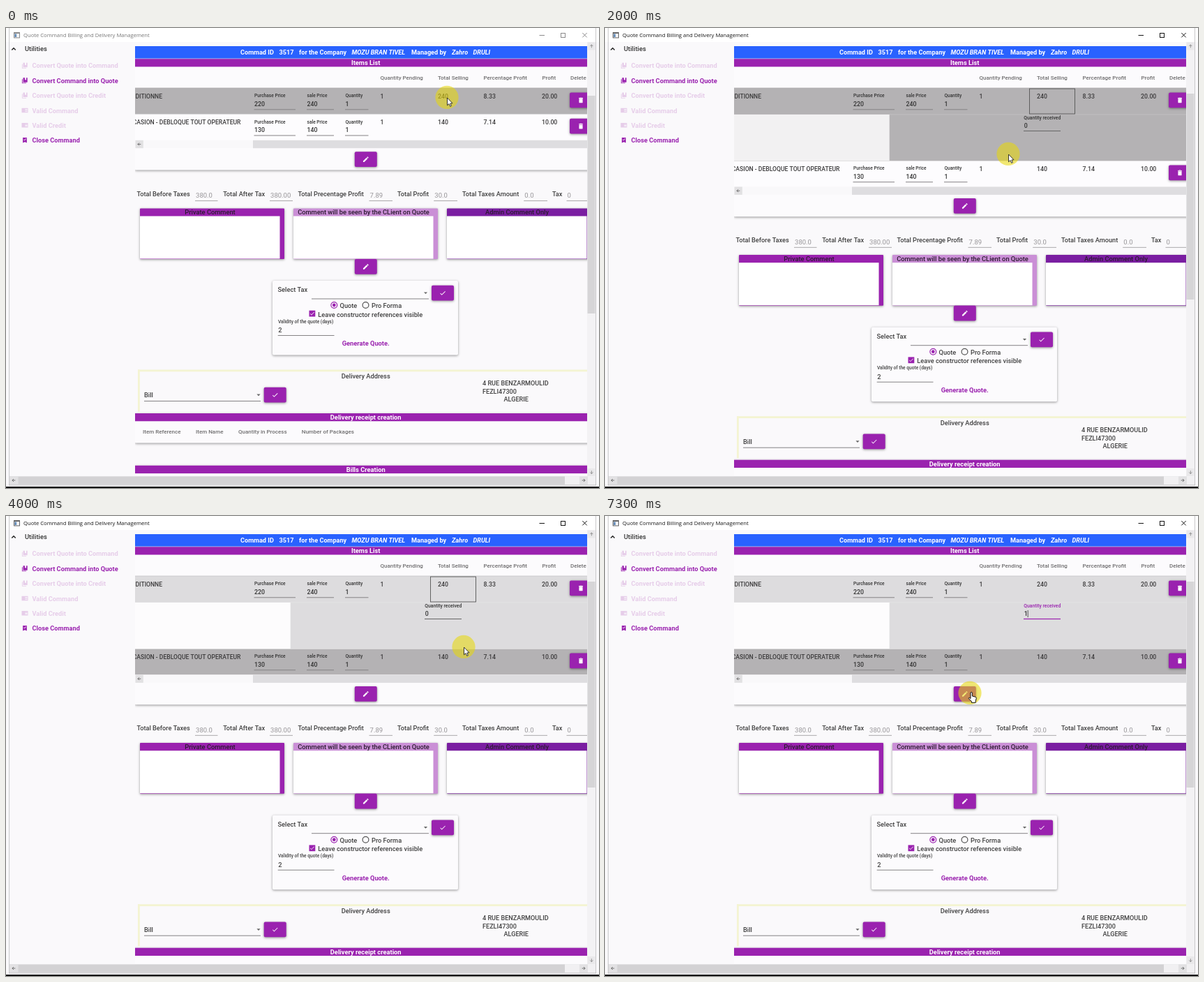
Recreate the animation shown at these times as an HTML page with a canvas. Size 850 px wide and 659 px high, loop 8000 ms.

```html
<!DOCTYPE html>
<html lang="en">
<head>
<meta charset="utf-8">
<title>Billing and delivery</title>
<style>
html, body { margin: 0; width: 100%; height: 100%; overflow: hidden; background: #faf9fb; }
canvas { display: block; width: 850px; height: 659px; }
</style>
</head>
<body>
<canvas id="stage" width="850" height="659"></canvas>
<script>
const ctx = document.getElementById('stage').getContext('2d');
const LOOP = 8000, STEP = 100, DETAIL = 66.7;
const PURPLE = '#9a22af', LILAC = '#ca8fd6', DEEP = '#7a1ea1';
const PALE = '#e6cde9', INK = '#404040', MUTED = '#706f70', PAGE = '#faf9fb';
const ROBOTO = 'Roboto, sans-serif', MID = 515.7;

const ICONS = {
  edit: 'M3 17.2V21h3.8L17.8 9.9l-3.7-3.7zM20.7 7a1 1 0 0 0 0-1.4l-2.3-2.3a1 1 0 0 0-1.4 0l-1.9 1.8 3.8 3.8z',
  check: 'M9 16.2 4.8 12l-1.4 1.4L9 19 21 7l-1.4-1.4z',
  trash: 'M6 19q0 2 2 2h8q2 0 2-2V7H6zM19 4h-3.5l-1-1h-5l-1 1H5v2h14z',
  copy: 'M2 7h2v13h13v2H2zM6 2h6v9l2.5-2 2.5 2V2h4v16H6z',
  table: 'M1 4h22v16H1zM13 8v1.7h8V8zM13 11.2v1.7h8v-1.7zM13 14.4v1.7h8v-1.7z',
  bookmark: 'M4 2h16v21l-8-4-8 4zM7 10l4 4 7-7-1.5-1.5-5.5 5.5-2.5-2.5z'
};
for (const name in ICONS) ICONS[name] = new Path2D(ICONS[name]);

const lerp = (a, b, k) => a + (b - a) * k;
const between = (t, from, to) => t >= from && t < to;

// Piecewise linear value through [time, ...values] keys
function track(keys, t) {
  const i = keys.findIndex(k => k[0] > t);
  if (i < 0) return keys[keys.length - 1].slice(1);
  if (i === 0) return keys[0].slice(1);
  const a = keys[i - 1], b = keys[i], k = (t - a[0]) / (b[0] - a[0]);
  return a.slice(1).map((v, n) => lerp(v, b[n + 1], k));
}

const POINTER = [
  [200, 632, 100], [600, 663, 105], [800, 664, 105], [1600, 664, 105], [2000, 578, 181],
  [2200, 581, 186], [2700, 606, 232], [3100, 619, 233], [3200, 619, 233], [3500, 640, 233],
  [3700, 646, 230], [4000, 656, 188], [4200, 650, 166], [4600, 618, 143], [4900, 614, 143],
  [7100, 614, 143], [7200, 572, 206], [7300, 523, 254]
];
const LABEL_FLOAT = [[5900, 1], [6200, 0], [6400, 0], [6700, 1]];

function rect(x, y, w, h, color) {
  ctx.fillStyle = color;
  ctx.fillRect(x, y, w, h);
}

function text(str, x, y, size = 9.25, color = INK, o = {}) {
  ctx.font = `${o.italic ? 'italic ' : ''}${o.weight || 500} ${size}px ${o.family || ROBOTO}`;
  ctx.textAlign = o.align || 'left';
  ctx.fillStyle = color;
  ctx.fillText(str, x, y + size * 0.355);
}

const heading = (str, x, y, color, size = 9.3) => text(str, x, y, size, color, { weight: 700, align: 'center' });
const hline = (x1, x2, y, color = '#858385', w = 1) => rect(x1, y - w / 2, x2 - x1, w, color);

function shape(points, fill, stroke, w = 1) {
  ctx.beginPath();
  points.forEach(([x, y]) => ctx.lineTo(x, y));
  if (fill) { ctx.closePath(); ctx.fillStyle = fill; ctx.fill(); }
  if (stroke) { ctx.lineWidth = w; ctx.strokeStyle = stroke; ctx.stroke(); }
}

function circle(x, y, r, fill, stroke) {
  ctx.beginPath();
  ctx.arc(x, y, r, 0, Math.PI * 2);
  if (fill) { ctx.fillStyle = fill; ctx.fill(); }
  if (stroke) { ctx.lineWidth = 1.2; ctx.strokeStyle = stroke; ctx.stroke(); }
}

function icon(name, x, y, scale, color) {
  ctx.save();
  ctx.translate(x - 12 * scale, y - 12 * scale);
  ctx.scale(scale, scale);
  ctx.fillStyle = color;
  ctx.fill(ICONS[name], 'evenodd');
  ctx.restore();
}

function card(x, y, w, h, color, r = 1) {
  ctx.save();
  ctx.shadowColor = 'rgba(0,0,0,.42)';
  ctx.shadowBlur = 3.5;
  ctx.shadowOffsetY = 1;
  ctx.beginPath();
  ctx.roundRect(x, y, w, h, r);
  ctx.fillStyle = color;
  ctx.fill();
  ctx.restore();
}

function button(x, y, name) {
  card(x, y, 32, 21.8, PURPLE, 2);
  icon(name, x + 16, y + 11, 0.43, '#fff');
}

const dropArrow = (x, y) => shape([[x - 2.6, y - 1.2], [x + 2.6, y - 1.2], [x, y + 1.5]], '#666');

// Small scrollbar arrow pointing along (dx, dy)
function scrollArrow(x, y, dx, dy, color = '#666') {
  shape([[x - dy * 2, y - dx * 2], [x + dx * 2, y + dy * 2], [x + dy * 2, y + dx * 2]], null, color, 0.9);
  if (dx) hline(x - 2.3, x + 2.3, y, color, 0.9);
  else rect(x - 0.45, y - 2.3, 0.9, 4.6, color);
}

function titleBar(active) {
  const color = active ? '#151515' : '#8b8a8b';
  rect(0, 0, 850, 20, '#fff');
  rect(11, 6, 9, 8.5, active ? '#666' : '#8a8a8a');
  rect(12, 8, 7, 5.5, '#f1f3f6');
  rect(12.5, 8.5, 2.5, 4.5, '#5c86b4');
  text('Quote Command Billing and Delivery Management', 25, 10.5, 7.65, active ? '#151515' : '#777',
    { weight: 400, family: '"Open Sans", sans-serif' });
  hline(764.5, 772, 10.5, color);
  ctx.strokeStyle = color;
  ctx.lineWidth = 1;
  ctx.strokeRect(795.5, 7.5, 6, 6);
  shape([[826.3, 7], [832.7, 13.4]], null, color);
  shape([[832.7, 7], [826.3, 13.4]], null, color);
}

function sidebar() {
  shape([[8.3, 31.5], [11, 28.7], [13.7, 31.5]], null, '#222', 1.4);
  text('Utilities', 27, 29.7, 9.35, '#333');
  [
    ['Convert Quote into Command', 'copy'],
    ['Convert Command into Quote', 'copy', true],
    ['Convert Quote into Credit', 'copy'],
    ['Valid Command', 'table'],
    ['Valid Credit', 'table'],
    ['Close Command', 'bookmark', true]
  ].forEach(([label, name, enabled], i) => {
    const y = 54.2 + i * 21.35, color = enabled ? PURPLE : PALE;
    icon(name, 27, y - 0.3, name === 'bookmark' ? 0.36 : 0.41, color);
    text(label, 37.5, y, 9.25, color, { weight: 700 });
  });
}

function banner() {
  rect(185, 26, 649, 17.6, '#2962ff');
  [
    ['Commad ID', 336], ['3517', 391.5], ['for the Company', 420],
    ['MOZU BRAN TIVEL', 495.5, true], ['Managed by', 581],
    ['Zahro', 639, true], ['DRULI', 669.5, true]
  ].forEach(([str, x, italic]) => text(str, x, 34.8, 9.15, '#fff', { weight: 700, italic }));
  rect(185, 44.2, 649, 11.3, PURPLE);
  heading('Items List', MID, 49.8, '#fff');
}

function itemRow(y, name, x, buy, sell, percent, profit) {
  text(name, x, y + 12, 8.6, '#3c3b3c');
  [['Purchase Price', buy, 356, 415], ['sale Price', sell, 431.5, 470], ['Quantity', '1', 486.5, 519.5]]
    .forEach(([label, value, x1, x2]) => {
      text(label, x1, y + 11, 6.6, '#333');
      text(value, x1, y + 22.6, 8.8, '#333');
      hline(x1 - 0.5, x2, y + 30.8);
    });
  [['1', 536.5], [sell, 619], [percent, 684.5], [profit, 768]]
    .forEach(([str, cx]) => text(str, cx, y + 12, 8.75, '#3c3b3c'));
  button(808, y + 6.5, 'trash');
}

function quantityField(t) {
  const [up] = track(LABEL_FLOAT, t);
  const focused = t >= 4900, empty = between(t, 6000, 6500);
  const x = lerp(592.5, 600.3, up), right = lerp(661.3, 653, up);
  const labelColor = !focused ? '#333' : up < 0.5 ? '#7b757d' : PURPLE;
  text('Quantity received', x, lerp(140.2, 128.2, up), lerp(8.75, 6.8, up), labelColor);
  if (!empty) text(t >= 6500 ? '1' : '0', x + 0.5, 140.2, 8.8, '#333');
  hline(x - 0.3, right, 147.5, focused ? PURPLE : '#666', focused ? 1.2 : 1);
  const blink = !between(t, 5400, 5800);
  if (focused && blink) rect(empty ? x : x + 5.4, 135, 0.9, 10.2, empty ? PURPLE : '#444');
}

function itemsCard(t, shift) {
  card(185, 44, 660, 159.5 + shift, '#fcfbfd');
  banner();
  [['Quantity Pending', 536.5], ['Total Selling', 619], ['Percentage Profit', 684.5], ['Profit', 768.5], ['Delete', 809]]
    .forEach(([str, x]) => text(str, x, 70.7, 8, MUTED));

  const overFirst = t < 2700 || between(t, 4100, 7200);
  const overSecond = between(t, 3800, 4100) || t >= 7200;
  const overBar = between(t, 2700, 3800);
  const shade = overFirst ? '#b4b2b4' : '#dddcde';

  rect(185, 86, 649, 37.5 + shift, shade);
  hline(185, 834, 86, overFirst ? '#adabad' : '#c4c3c5', 0.8);
  if (shift > 0) {
    ctx.save();
    ctx.beginPath();
    ctx.rect(185, 123.5, 649, shift);
    ctx.clip();
    rect(185, 124, 222.7, DETAIL, overFirst ? '#f2f1f2' : '#fdfcfd');
    hline(185, 834, 123.8, 'rgba(255,255,255,.35)', 0.8);
    quantityField(t);
    ctx.restore();
  }
  itemRow(86, 'DITIONNE', 185.5, '220', '240', '8.33', '20.00');
  if (between(t, 300, 4800)) {
    ctx.strokeStyle = '#555';
    ctx.lineWidth = 0.9;
    ctx.strokeRect(608.5, 87, 65, 36);
  }

  ctx.save();
  ctx.translate(0, shift);
  rect(185, 123.7, 649, 37, overSecond ? '#b4b2b4' : '#fdfcfe');
  hline(185, 834, 123.7, '#dcdbdc', 0.8);
  itemRow(123.2, 'CASION - DEBLOQUE TOUT OPERATEUR', 181.7, '130', '140', '7.14', '10.00');
  rect(185, 160.8, 649, 11.4, '#f9f8fa');
  rect(185.5, 160.8, 11.3, 11.4, '#e2e1e3');
  scrollArrow(191, 166.5, -1, 0);
  rect(354, 160.8, 480, 11.4, overBar ? '#b1b0b1' : '#dedde0');
  button(499.8, 177.2, 'edit');
  ctx.restore();
}

function totals() {
  [
    ['Total Before Taxes', 187.5, '380.0', 271.5, 303.5],
    ['Total After Tax', 311.2, '380.00', 378.5, 411],
    ['Total Precentage Profit', 418.5, '7.89', 521, 554],
    ['Total Profit', 561, '30.0', 613.7, 647],
    ['Total Taxes Amount', 654, '0.0', 742.7, 776],
    ['Tax', 783, '0', 804, 834]
  ].forEach(([label, x, value, x1, x2]) => {
    text(label, x, 237.3, 9.2);
    text(value, x1 + 0.6, 240, 9.5, '#979598', { weight: 400 });
    hline(x1 - 0.5, x2, 247.6, '#a3a1a3', 0.9);
  });
}

function commentBox(x, title, color) {
  card(x, 258.4, 207, 72.6, color);
  rect(x, 269.5, 200.5, 61, '#fff');
  text(title, x + 100.5, 264, 9.3, '#2b1a30', { align: 'center' });
}

function quoteCard() {
  card(382, 362, 266, 106.5, '#fcfbfd', 2);
  text('Select Tax', 389.5, 375.2);
  hline(438, 606, 388);
  dropArrow(601.5, 379.6);
  button(610, 368.8, 'check');
  circle(470.3, 397, 4.4, null, PURPLE);
  circle(470.3, 397, 2.4, PURPLE);
  text('Quote', 478.5, 397.8);
  circle(515.5, 397, 4.4, null, '#555');
  text('Pro Forma', 524, 397.8);
  rect(434.5, 404.7, 8.8, 8.8, PURPLE);
  icon('check', 438.9, 409, 0.34, '#fff');
  text('Leave constructor references visible', 447.3, 410.4);
  text('Validity of the quote (days)', 390, 420.2, 6.6);
  text('2', 390.3, 432.7);
  hline(389.7, 470.5, 440.5);
  heading('Generate Quote.', MID, 452, PURPLE);
}

function delivery() {
  rect(189, 489.5, 645, 2.8, '#f4f4d2');
  rect(189, 489.5, 2.8, 60, '#f4f4d2');
  text('Delivery Address', MID, 498.5, 9.3, INK, { align: 'center' });
  text('4 RUE BENZARMOULID', 683, 509.2, 9.1);
  text('FEZLI47300', 683, 520.6, 9.1);
  text('ALGERIE', 713.5, 532, 9.1);
  text('Bill', 198, 525.7);
  hline(198, 365, 534.5);
  dropArrow(362, 525.7);
  button(369.7, 514.8, 'check');

  card(185, 552, 660, 42.5, '#fcfbfd');
  rect(185, 552, 649, 11.3, PURPLE);
  heading('Delivery receipt creation', MID, 557.8, '#fff');
  [['Item Reference', 196], ['Item Name', 272], ['Quantity in Process', 333], ['Number of Packages', 423.7]]
    .forEach(([str, x]) => text(str, x, 578.3, 8, MUTED));

  card(185, 626.8, 660, 60, '#fcfbfd');
  rect(185, 626.8, 649, 11.3, PURPLE);
  heading('Bills Creation', MID, 632.5, '#fff');
}

function mainPane(t, open) {
  ctx.save();
  ctx.beginPath();
  ctx.rect(185, 20, 648, 622.3);
  ctx.clip();
  const shift = DETAIL * open;
  itemsCard(t, shift);
  ctx.translate(0, shift);
  totals();
  commentBox(192, 'Private Comment', PURPLE);
  commentBox(412, 'Comment will be seen by the CLient on Quote', LILAC);
  commentBox(632, 'Admin Comment Only', DEEP);
  button(499.8, 331, 'edit');
  quoteCard();
  delivery();
  ctx.restore();
}

function windowFrame(open) {
  rect(833, 20, 12, 622.5, '#f3f2f4');
  const top = lerp(97, 94, open);
  rect(833.5, top, 11, lerp(409, 389, open) - top, '#d6d5d7');
  rect(833.5, 20.5, 11, 11, '#e9e8ea');
  scrollArrow(839.3, 26, 0, -1, '#888');
  rect(833.5, 631, 11, 11, '#e9e8ea');
  scrollArrow(839.3, 636.5, 0, 1, '#888');
  rect(5, 642.4, 840, 11.4, '#f1f0f2');
  rect(5, 642.4, 796, 11.4, '#d3d2d4');
  rect(5, 642.4, 12.5, 11.4, '#e2e1e3');
  rect(822, 642.4, 12, 11.4, '#e2e1e3');
  scrollArrow(11, 648, -1, 0);
  scrollArrow(828, 648, 1, 0);
  rect(4.2, 0, 0.9, 655, '#c3c2c4');
  rect(845, 0, 0.9, 655, '#c3c2c4');
  hline(4, 846, 655, '#b9b8ba');
  rect(0, 657, 850, 2, '#111');
}

function pointer(t) {
  const [x, y] = track(POINTER, t);
  circle(x, y - 0.6, 16.6, 'rgba(232,217,12,.57)');
  ctx.save();
  ctx.translate(x, y);
  if (between(t, 4500, 7200)) {
    ctx.translate(2.5, -0.5);
    rect(-0.5, -5, 1, 10, '#222');
    hline(-2.5, 2.5, -5, '#222');
    hline(-2.5, 2.5, 5, '#222');
  } else if (t >= 7300) {
    const hand = new Path2D('M1-1q1.3-1.2 2.4 0v5l5 1.3q1 .4.8 2l-1 4v2H2.5v-1.5L-1.7 7.6q-.2-1.5 1-1.3L1 7.6z');
    ctx.fillStyle = '#fff';
    ctx.fill(hand);
    ctx.lineWidth = 1;
    ctx.strokeStyle = '#111';
    ctx.stroke(hand);
  } else {
    shape([[0.5, 0], [0.5, 10.8], [3, 8.6], [4.7, 12.4], [6.4, 11.6], [4.8, 8], [8, 7.8], [0.5, 0]], '#fff', '#222', 0.9);
  }
  ctx.restore();
}

function draw(t) {
  const k = Math.min(1, Math.max(0, (t - 200) / 300));
  const open = k * k * (3 - 2 * k);
  rect(0, 0, 850, 659, PAGE);
  titleBar(t >= 200);
  sidebar();
  mainPane(t, open);
  windowFrame(open);
  pointer(t);
}

const start = performance.now();
function tick() {
  const t = (performance.now() - start) % LOOP;
  draw(Math.floor(t / STEP) * STEP);
  requestAnimationFrame(tick);
}
tick();
</script>
</body>
</html>
```
